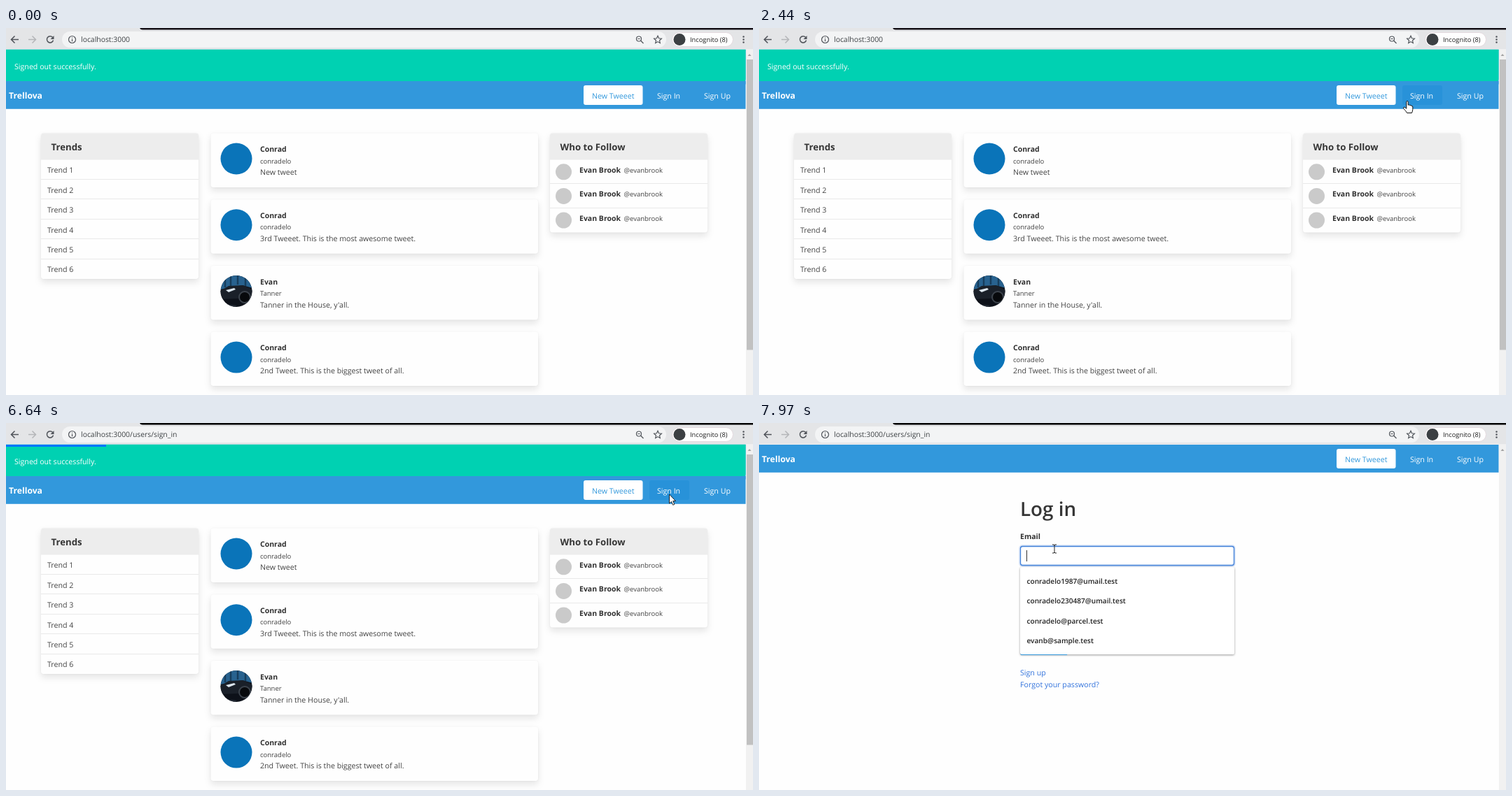
An HTML page that plays this animation: 1067x525 px, repeating every 8 s.

```html
<!DOCTYPE html>
<html lang="en">
<head>
<meta charset="utf-8">
<title>Sign in walkthrough</title>
<style>
html, body { margin: 0; width: 100%; height: 100%; overflow: hidden; background: #fefefe; }
svg { display: block; }
text { font: 10.65px "Open Sans", "Noto Sans", sans-serif; fill: #434343; text-rendering: geometricPrecision; white-space: pre; }
text.b { font-weight: 700; font-size: 10.5px; fill: #303030; }
text.small { font-size: 9.5px; }
text.head { font-weight: 700; font-size: 13.2px; fill: #363636; }
text.title { font-weight: 550; font-size: 27.8px; fill: #363636; }
text.brand { font-weight: 700; font-size: 12.2px; fill: #fff; }
text.url { font-size: 10.4px; fill: #3c4043; }
text.mail { font-size: 10.1px; font-weight: 550; fill: #222; }
text.w { fill: #fff; font-weight: 500; }
text.big { font-size: 13.9px; }
text.link { fill: #3273dc; }
.card { fill: #fefefe; filter: drop-shadow(0 5px 5px rgba(10,10,10,.1)) drop-shadow(0 0 1px rgba(10,10,10,.06)); }
.icon { fill: none; stroke: #50545a; stroke-width: 1.5; }
.thin { stroke-width: 1.2; }
.field { fill: #fff; stroke: #d6d6d6; }

.home, .login, .nav, .hover, .path, .strip, .arrow, .hand, .beam, .focus, .menu, .bar {
  animation: 8s step-end infinite;
}
.home { animation-name: home; }
.login { animation-name: login; }
.nav { animation-name: nav; }
.hover { animation-name: hover; }
.path { animation-name: path; }
.strip { animation-name: strip; }
.arrow { animation-name: arrow; }
.hand { animation-name: hand; }
.beam { animation-name: beam; }
.focus { animation-name: focus; }
.menu { animation-name: menu; }
.bar { animation-name: load, fade; animation-timing-function: linear; }
.pointer { animation: move 8s infinite; }

@keyframes home { 0% { visibility: visible } 83.95%, 100% { visibility: hidden } }
@keyframes login { 0% { visibility: hidden } 83.95%, 100% { visibility: visible } }
@keyframes nav { 0% { transform: translateY(45px) } 83.95%, 100% { transform: none } }
@keyframes hover { 0% { visibility: hidden } 30.4% { visibility: visible } 83.95%, 100% { visibility: hidden } }
@keyframes path { 0% { visibility: hidden } 43.8%, 100% { visibility: visible } }
@keyframes strip { 0% { fill: #17131a } 39.35%, 100% { fill: #000 } }
@keyframes arrow { 0% { visibility: visible } 30.4% { visibility: hidden } 82.95% { visibility: visible } 92.55%, 100% { visibility: hidden } }
@keyframes hand { 0% { visibility: hidden } 30.4% { visibility: visible } 82.95%, 100% { visibility: hidden } }
@keyframes beam { 0% { visibility: hidden } 92.55%, 100% { visibility: visible } }
@keyframes focus { 0% { visibility: hidden } 95.45%, 100% { visibility: visible } }
@keyframes menu { 0% { visibility: hidden } 97.45%, 100% { visibility: visible } }
@keyframes load {
  0% { width: 0; animation-timing-function: step-end }
  49.1%, 53.3% { width: 102px }
  56.9%, 59.75% { width: 106px }
  69.6% { width: 124px }
  77.25%, 79% { width: 139px }
  82.9% { width: 143px }
  83.2% { width: 143px; animation-timing-function: ease }
  86.95%, 100% { width: 1057px }
}
@keyframes fade {
  0%, 85% { opacity: 1; animation-timing-function: ease-in }
  86.9%, 100% { opacity: 0 }
}
@keyframes move {
  0% { transform: translate(190px, 530px); animation-timing-function: step-end }
  4.2% { transform: translate(190px, 530px); animation-timing-function: steps(11, start) }
  15.06% { transform: translate(406px, 245px); animation-timing-function: steps(1, start) }
  16.05% { transform: translate(475px, 249px); animation-timing-function: steps(5, start) }
  20.9% { transform: translate(680px, 178px); animation-timing-function: steps(5, start) }
  25.7% { transform: translate(814px, 114px); animation-timing-function: steps(6, start) }
  31.37% { transform: translate(924px, 104px); animation-timing-function: steps(5, start) }
  36.7% { transform: translate(949px, 103px); animation-timing-function: steps(2, start) }
  38.6% { transform: translate(947px, 101px); animation-timing-function: step-end }
  89.7% { transform: translate(947px, 101px); animation-timing-function: steps(5, start) }
  94.6% { transform: translate(440px, 206px); animation-timing-function: step-end }
  95.45% { transform: translate(440px, 206px); animation-timing-function: steps(2, start) }
  97.4% { transform: translate(422px, 176px); animation-timing-function: steps(2, start) }
  99.4%, 100% { transform: translate(422px, 180px) }
}
</style>
</head>
<body>
<svg width="1067" height="525" viewBox="0 0 1067 525">
  <defs>
    <clipPath id="round"><circle cx="329" cy="376.5" r="22.5"/></clipPath>
  </defs>
  <rect width="1067" height="525" fill="#fefefe"/>

  <rect x="1057" y="31" width="10" height="494" fill="#f1f1f1"/>
  <path d="M1059.500 40l2.500-3 2.500 3z" fill="#a3a3a3"/>

  <g class="home">
    <rect y="30.500" width="1056.500" height="50" fill="#3298dc"/>
    <path d="M0 30.500H1056.500V73a3 3 0 0 1-3 3H0z" fill="#00d1b2"/>
    <text class="w" x="12" y="58.500">Signed out successfully.</text>
    <rect x="1058" y="45" width="9" height="415.500" fill="#c1c1c1"/>
    <g id="feed"></g>
  </g>

  <g class="login">
    <text class="title" x="373" y="133">Log in</text>
    <text class="b" x="373" y="166">Email</text>
    <rect class="field" x="373.500" y="176.500" width="305" height="27" rx="3"/>
    <text class="b" x="373" y="225">Password</text>
    <rect class="field" x="373.500" y="235.500" width="305" height="27" rx="3"/>
    <rect x="373.500" y="276" width="7.500" height="7.500" rx="1" fill="#eee" stroke="#aaa"/>
    <text x="381.500" y="284">Remember me</text>
    <rect x="373" y="297" width="68" height="35" rx="3" fill="#3298dc"/>
    <text class="w big" x="388" y="319.500">Log in</text>
    <text class="link" x="373" y="361">Sign up</text>
    <text class="link" x="373" y="378">Forgot your password?</text>
  </g>

  <g class="focus">
    <rect x="373" y="176" width="306" height="28" rx="3" fill="none" stroke="#3273dc" stroke-opacity=".2" stroke-width="3.500"/>
    <rect x="373.500" y="176.500" width="305" height="27" rx="3" fill="#fff" stroke="#3f7fd8" stroke-width="1.300"/>
    <path d="M382.500 182V198" stroke="#333"/>
  </g>
  <g class="menu">
    <rect x="373" y="206" width="306" height="125" rx="2" fill="#fff" style="filter:drop-shadow(0 1px 1.500px rgba(0,0,0,.4))"/>
    <path d="M374 331.500H440" stroke="#3298dc"/>
    <g id="mails"></g>
  </g>

  <g class="nav">
    <rect y="31" width="1056.500" height="39.800" fill="#3298dc"/>
    <text class="brand" x="4" y="56">Trellova</text>
    <rect x="825" y="37" width="84.500" height="28" rx="3" fill="#fff"/>
    <text x="837" y="56" style="fill:#3298dc">New Tweeet</text>
    <rect class="hover" x="919" y="37" width="57" height="28" rx="3" fill="#2892d9"/>
    <text class="w" x="930" y="56">Sign In</text>
    <text class="w" x="997" y="56">Sign Up</text>
  </g>

  <rect class="bar" y="31" height="3" fill="#0076ff"/>

  <g>
    <rect width="1067" height="30.600" fill="#e4e5e7"/>
    <path class="strip" d="M191 0q1 2.500 4 2.500H1067V0z"/>
    <rect x="80" y="5" width="863" height="23" rx="11.500" fill="#f3f4f5"/>
    <path class="icon" d="M18 16.500H8M12.500 11.500l-5 5 5 5"/>
    <path class="icon" d="M32 16.500H42M37.500 11.500l5 5-5 5" style="stroke:#b4b6b9"/>
    <path class="icon" d="M66.500 13.300A4.600 4.600 0 1 0 67.500 17.500"/>
    <path d="M68.500 11v5h-5z" fill="#50545a"/>
    <circle class="icon thin" cx="94.500" cy="16.500" r="5"/>
    <path class="icon thin" d="M94.500 15.800v3.400M94.500 13.400v1.200"/>
    <text class="url" x="107" y="20">localhost:3000<tspan class="path">/users/sign_in</tspan></text>
    <circle class="icon thin" cx="904" cy="15.500" r="3.500"/>
    <path class="icon thin" d="M906.500 18l4 4M902.300 15.500h3.400"/>
    <path class="icon thin" d="M931 11.300l1.600 3.500 3.800.4-2.900 2.600.8 3.800-3.300-2-3.300 2 .8-3.800-2.900-2.600 3.800-.4z"/>
    <rect x="951.500" y="6.500" width="87" height="20" rx="10" fill="#fefefe" stroke="#e3d9de"/>
    <circle cx="962" cy="16.500" r="8.500" fill="#3c4043"/>
    <text class="url" x="977" y="20" style="font-size:9.3px;fill:#222">Incognito (8)</text>
    <g fill="#50545a"><circle cx="1053.500" cy="12.500" r="1.200"/><circle cx="1053.500" cy="16.500" r="1.200"/><circle cx="1053.500" cy="20.500" r="1.200"/></g>
  </g>

  <g class="pointer">
    <path class="arrow" d="M.5 1V14L3.500 11.400 5.600 16.300 7.800 15.400 5.700 10.600H9.500z" fill="#fff" stroke="#111" stroke-width=".9"/>
    <path class="hand" d="M.8 10.500V1.700Q.8.500 2 .5T3.200 1.700V6.200Q5 5.400 5.700 6.700 7.300 6 8 7.400 9.600 7 9.800 9V12.500Q9.500 15 8.500 17.500H1.500Q0 14.500-3 11.500-4 10-3 9.300-1.800 8.800.8 11.300z" fill="#fff" stroke="#111"/>
    <path class="beam" d="M-3-6H-1L0-5 1-6H3M0-5V5M-3 6H-1L0 5 1 6H3" fill="none" stroke="#222"/>
  </g>
</svg>
<script>
const text = (x, y, s, cls = '') => `<text class="${cls}" x="${x}" y="${y}">${s}</text>`;
const line = (x, y, w) => `<path d="M${x} ${y}h${w}" stroke="#e9e9e9"/>`;
const card = (x, y, w, h) => `<rect class="card" x="${x}" y="${y}" width="${w}" height="${h}" rx="4"/>`;
const panel = (x, h, title) => card(x, 150.5, 225, h) +
  `<path d="M${x} 188.500V154.500a4 4 0 0 1 4-4h217a4 4 0 0 1 4 4v34z" fill="#ededed"/>` +
  text(x + 14.5, 175, title, 'head');

const photo = `<g clip-path="url(#round)">
  <rect x="306" y="354" width="46" height="46" fill="#0d1119"/>
  <path d="M306 354h46v18l-14-4-32 6z" fill="#28628f"/>
  <path d="M313 354v17M321 354v15M331 354v13M342 354v15" stroke="#173d5c" stroke-width="2.500"/>
  <path d="M306 376l12-7 20-1 14 6v12l-46 2z" fill="#1a2029"/>
  <path d="M314 375l12-3 2 2-10 4z" fill="#dce6ee"/>
  <circle cx="341" cy="385" r="8" fill="#07090c" stroke="#3c434c" stroke-width="2"/>
  <path d="M306 394l24 3-4 3h-20z" fill="#242b35"/></g>`;

const posts = [
  ['Conrad', 'conradelo', 'New tweet'],
  ['Conrad', 'conradelo', '3rd Tweeet. This is the most awesome tweet.'],
  ['Evan', 'Tanner', "Tanner in the House, y'all."],
  ['Conrad', 'conradelo', '2nd Tweet. This is the biggest tweet of all.']
];

let feed = panel(50, 208.5, 'Trends');
for (let i = 0; i < 6; i++) {
  const y = 188.5 + i * 28.4;
  if (i) feed += line(50, Math.round(y) - .5, 225);
  feed += text(59, y + 18.8, `Trend ${i + 1}`);
}
feed += panel(777, 142, 'Who to Follow');
for (let i = 0; i < 3; i++) {
  const y = 188.5 + i * 34.6;
  if (i) feed += line(777, Math.round(y) - .5, 225);
  feed += `<circle cx="796.500" cy="${y + 17.3}" r="11.500" fill="#cacaca"/>` +
    text(819, y + 18.3, 'Evan Brook', 'b') + text(882.5, y + 18.3, '@evanbrook', 'small');
}
posts.forEach(([name, user, msg], i) => {
  const y = 150.5 + i * 94.7;
  feed += card(292.5, y, 467.5, 77.5) +
    (i === 2 ? photo : `<circle cx="329" cy="${y + 36.5}" r="22.500" fill="#0a74b9"/>`) +
    text(363, y + 26.7, name, 'b') + text(363, y + 43, user, 'small') + text(363, y + 59.7, msg);
});
document.getElementById('feed').innerHTML = feed;

document.getElementById('mails').innerHTML = [
  'conradelo1987@umail.test', 'conradelo230487@umail.test', 'conradelo@parcel.test', 'evanb@sample.test'
].map((s, i) => text(382.5, 230 + i * 28.3, s, 'mail')).join('');
</script>
</body>
</html>
```
